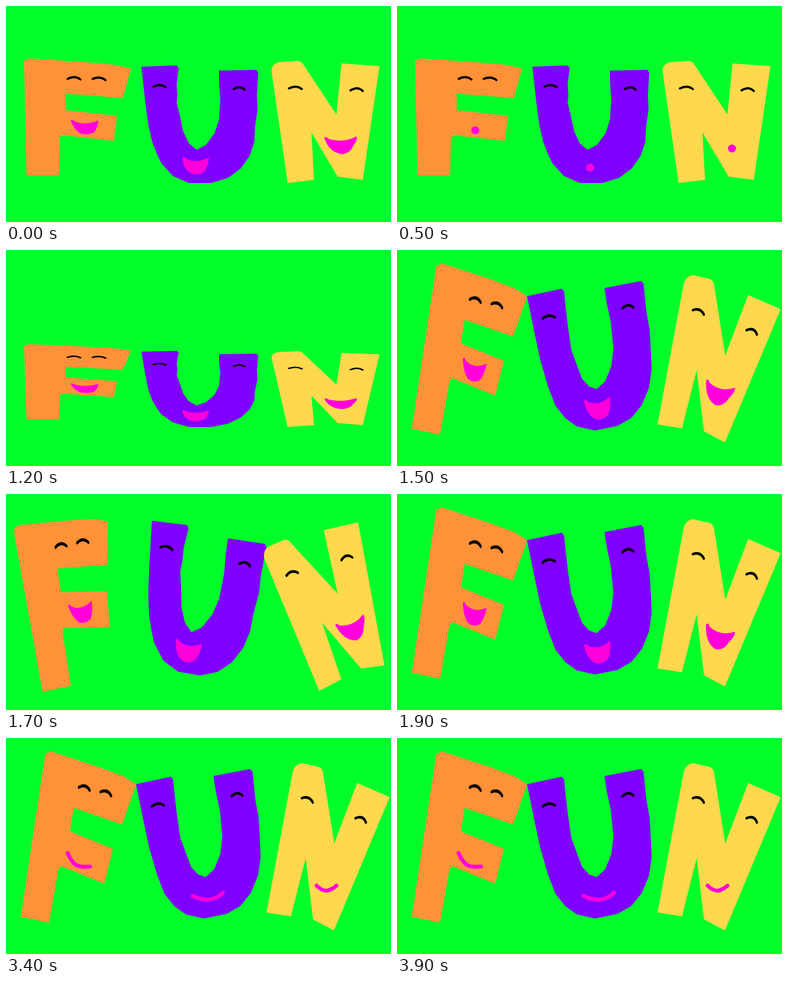
Animation, 600 px wide and 338 px high, one loop 4000 ms. Source, as an HTML page:

```html
<!DOCTYPE html>
<html lang="en">
<head>
<meta charset="utf-8">
<title>Dancing letters</title>
<style>
  html, body { margin: 0; width: 100%; height: 100%; overflow: hidden; background: #00ff2a; }
  svg { display: block; width: 600px; height: 338px; }
  .eyes, .smile { fill: none; stroke-linecap: round; stroke-linejoin: round; }
  .eyes { stroke: #000; stroke-width: 3.4; }
  .smile { stroke: #ff00dc; stroke-width: 6; }
  .open, .dot { fill: #ff00dc; }
</style>
</head>
<body>
<svg id="stage" viewBox="0 0 600 338"></svg>
<script>
// Each letter: upright artwork, plus the linear map and centres of its leaning poses.
const letters = [
  {
    color: '#ff9139',
    body: 'M28 86L37 82L125 88L170 92L195 98L182 144L93 137V163L173 172L168 211L88 202L84 206L83 265H32Z',
    eyes: 'M96 114Q107 108 116 115M135 114Q147 109 155 116',
    open: 'M101 179Q103 176 106 180Q122 188 144 179Q143 191 137 198Q126 203 115 199Q105 192 101 179Z',
    dot: [122, 194.5],
    smile: 'M96 180Q101 192 108 198Q115 203 131 201',
    center: [111, 174], lean: [.864, .182, -.233, 1.419],
    right: [112.5, 165], left: [104, 166],
    floor: 265, squash: .643
  },
  {
    color: '#8000ff',
    body: 'M211 95L266 93L269 97L266 122L267 140L266 152L271 172L276 196L285 215L297 225' +
      'L312 217L325 199L332 178L334 145L332 120V101L390 100L393 104L391 140L392 162L388 190L387 212L380 234' +
      'L366 254L346 269L320 277H285L260 266L242 246L235 231L228 213L222 187L217 150Z',
    // The left stroke bows out a little when the letter leans.
    leanBody: 'M211 95L266 93L269 97L268 115L267 141V171L273 194L277 209L286 220L297 225' +
      'L312 217L325 199L332 178L334 145L332 120V101L390 100L393 104L391 140L392 162L389 190L386 212L378 234' +
      'L363 254L344 268L321 275L285 276L258 267L242 254L230 237L223 212L217 177L214 140Z',
    eyes: 'M230 126Q241 121 249 127M355 130Q365 124 372 131',
    open: 'M275 237Q278 235 281 239Q297 247 316 237Q315 252 309 259Q296 268 284 259Q276 252 275 237Z',
    dot: [301, 253],
    smile: 'M291 247Q302 253 315 253Q329 252 338 242',
    center: [302, 186], lean: [.989, -.167, .18, 1.23],
    right: [309, 169], left: [301, 169],
    floor: 277, squash: .648
  },
  {
    color: '#ffd84d',
    body: 'M414 103L414 98Q417 90 425 88L453 86Q460 86 463 91L515 170L523 90L582 94L556 272L517 267' +
      'L476 198L480 272L439 277Z',
    eyes: 'M441 129Q452 123 461 130M537 132Q548 125 556 133',
    open: 'M496 206Q499 203 503 208Q526 215 546 204Q549 208 541 219Q537 230 524 232Q503 229 496 206Z',
    dot: [522, 223],
    smile: 'M484 231Q492 239 500 239Q509 237 515 231',
    center: [500, 182], lean: [.882, .291, -.359, 1.214],
    right: [494, 175.5], left: [508, 175],
    floor: 277, squash: .62
  }
];

const stage = document.getElementById('stage');
stage.innerHTML = letters.map(l => `<g>
  <g class="pose">
    <path class="body" fill="${l.color}"/>
    <path class="eyes" d="${l.eyes}"/>
    <path class="open" d="${l.open}"/>
    <circle class="dot" cx="${l.dot[0]}" cy="${l.dot[1]}" r="6.2"/>
  </g>
  <path class="smile" d="${l.smile}"/>
</g>`).join('');
const groups = [...stage.children];

function transformFor(l, pose) {
  if (pose === 'upright') return '';
  if (pose === 'squash') return `matrix(1 0 0 ${l.squash} 0 ${l.floor * (1 - l.squash)})`;
  const [a, b, c, d] = l.lean, sign = pose === 'right' ? 1 : -1;
  const [x, y] = l.center;
  return `translate(${l[pose]}) matrix(${a} ${sign * b} ${sign * c} ${d} 0 0) translate(${-x} ${-y})`;
}

// The dance holds each move for one 200 ms beat.
function moveAt(t) {
  const beat = Math.floor((t + 100) / 200), odd = beat % 2 === 1;
  if (beat < 4) return ['upright', odd ? 'dot' : 'open'];
  if (beat < 7) return [odd ? 'upright' : 'squash', 'open'];
  if (beat < 12) return [odd ? 'left' : 'right', 'open'];
  return ['right', t < 3300 ? 'open' : 'smile'];
}

function draw() {
  const [pose, mouth] = moveAt(performance.now() % 4000);
  groups.forEach((g, i) => {
    const l = letters[i];
    g.querySelector('.pose').setAttribute('transform', transformFor(l, pose));
    g.querySelector('.body').setAttribute('d', pose === 'right' && l.leanBody || l.body);
    for (const kind of ['open', 'dot', 'smile'])
      g.querySelector('.' + kind).style.display = kind === mouth ? '' : 'none';
  });
  requestAnimationFrame(draw);
}
draw();
</script>
</body>
</html>
```
